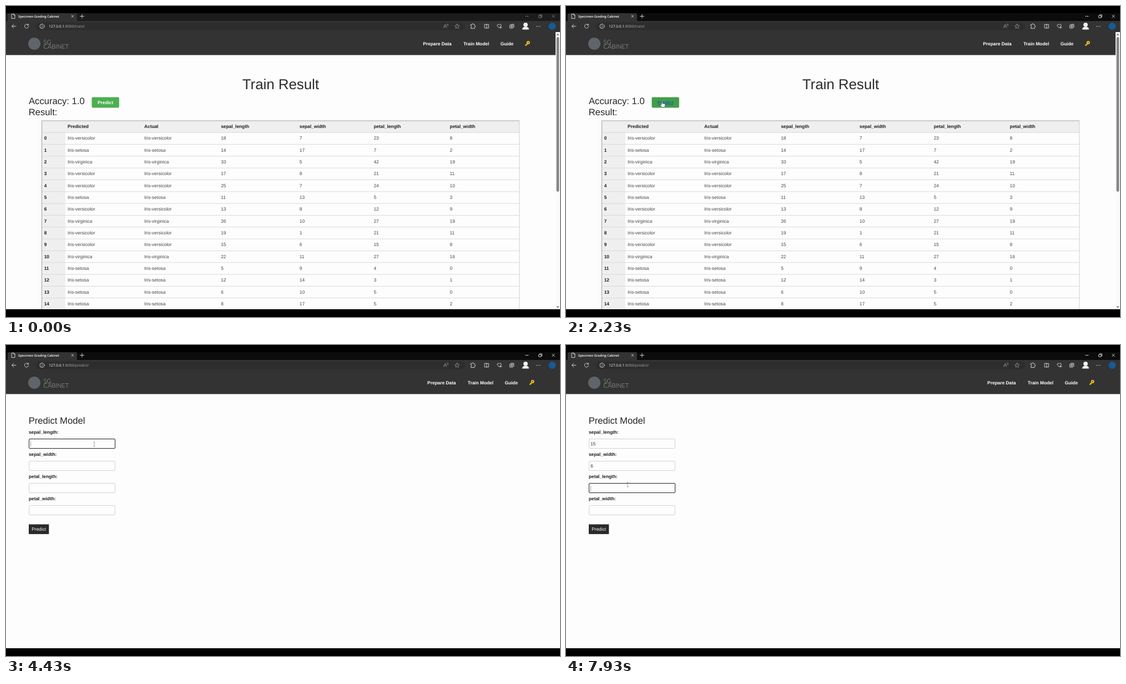
An HTML page for the animation above (8000 ms loop, 998 px wide and 561 px high).

```html
<!DOCTYPE html>
<html lang="en">
<head>
<meta charset="utf-8">
<title>Specimen Grading Cabinet</title>
<style>
  html, body { margin: 0; width: 100%; height: 100%; overflow: hidden; background: #000; }
  svg { display: block; width: 998px; height: 561px; }
  text { font: 8.32px "Liberation Sans", Arial, sans-serif; fill: #333; white-space: pre; text-rendering: geometricPrecision; }
  .bold { font-weight: bold; fill: #1c1c1c; }
  .head { font-size: 16.64px; fill: #262626; }
  .title { font-size: 25.8px; fill: #2b2b2b; }
  .white { fill: #fff; }
  .cell { fill: #444; }
  .ui { font: 6.7px "Open Sans", sans-serif; fill: #fff; }
  .tab { font-size: 5.8px; font-weight: 600; }
  .brand { font: 300 11px Lato, sans-serif; fill: #aab0b6; }
  .icon { fill: none; stroke: #ddd; stroke-width: .9; stroke-linecap: round; stroke-linejoin: round; }
  .pointer { fill: #fff; stroke: #555; stroke-width: .7; stroke-linejoin: round; }
</style>
</head>
<body>
<svg id="stage" viewBox="0 0 998 561"></svg>
<script>
const LOOP = 8000;
const ACTIVATE = 1250, HOVER = 1700, NAVIGATE = 2430;

const rect = (x, y, w, h, fill, extra = '') =>
  `<rect x="${x}" y="${y}" width="${w}" height="${h}" fill="${fill}" ${extra}/>`;
const text = (x, y, content, cls = '', extra = '') =>
  `<text x="${x}" y="${y}" class="${cls}" ${extra}>${content}</text>`;
const icon = (d, extra = '') => `<path class="icon" d="${d}" ${extra}/>`;
const ring = (x, y, r) => `<circle class="icon" cx="${x}" cy="${y}" r="${r}"/>`;
const disc = (x, y, r, fill) => `<circle cx="${x}" cy="${y}" r="${r}" fill="${fill}"/>`;

function browser() {
  return rect(0, 13, 998, 14, '#1c1c1c', 'id="titlebar"') +
    rect(0, 27, 998, 20, '#333') +
    '<path d="M3 27V16q0-3 3-3H125q3 0 3 3V27z" fill="#333"/>' +
    rect(53, 30, 774, 13.5, '#2d2d2d', 'rx="6.5"') +
    icon('M10.5 14.5H14l2 2V22.5H10.5zM14 14.5v2h2') +
    text(22, 20.6, 'Specimen Grading Cabinet', 'ui tab') +
    icon('M118 16.7l3.6 3.6m0-3.6l-3.6 3.6M133.5 18.5h7M137 15v7') +
    '<g id="controls">' +
    icon('M936 18.5h5M960 17.2h4v4h-4zM961.5 17v-1.2h4v4h-1.3M983.8 16.2l4.6 4.6m0-4.6l-4.6 4.6') + '</g>' +
    icon('M18 36.5H10.5M13.8 33.2L10.5 36.5l3.3 3.3') +
    icon('M40 34.3A3.6 3.6 0 1 0 40.6 37M40.4 32.5v2.2h-2.2') +
    ring(65, 36.5, 4) + icon('M65 36v2.3M65 34.5v.1') +
    text(77, 39, '127.0.0.1<tspan id="path" fill="#aaa"></tspan>', 'ui') +
    icon('M788.3 39.5l2.7-6.5 2.7 6.5M789.3 37.2h3.5M794.5 33q1 1 0 2.5M796 32q1.5 2 0 4', 'opacity=".5"') +
    icon('M812.7 32.5l1.2 2.6 2.9.3-2.1 2 .6 2.8-2.6-1.4-2.6 1.4.6-2.8-2.1-2 2.9-.3z', 'opacity=".55"') +
    icon('M837.5 33.5h2a1.5 1.5 0 0 1 3 0h1.5v2a1.5 1.5 0 0 1 0 3v2h-6.5v-2a1.5 1.5 0 0 0 0-3z') +
    icon('M862.5 33.3h7v6.5h-7zM866 33v7') +
    icon('M888.5 39.5l-3.2-3.2a1.9 1.9 0 0 1 3.2-2.3 1.9 1.9 0 0 1 3.4 2M889 38.5h4m-2-2v4') +
    icon('M908 34.5h5v5.5h-5zM909.8 33h5v5.5M910.5 35.7v3m-1.5-1.5h3') +
    disc(936, 33.8, 3.9, '#f4f4f4') + '<path d="M930 42.5q0-5 6-5t6 5z" fill="#f4f4f4"/>' +
    [956, 959, 962].map(x => disc(x, 36.8, .7, '#ddd')).join('') +
    disc(984, 36.5, 6.5, '#175a94');
}

function siteHeader() {
  const links = [[751.3, 'Prepare Data'], [824, 'Train Model'], [890.7, 'Guide']];
  return rect(0, 47, 998, 41.5, '#333', 'id="navbar"') +
    disc(51, 68, 11, '#5f656b') +
    text(67.5, 69, 'SG', 'brand') + text(67.5, 76.6, 'CABINET', 'brand') +
    '<g id="links">' + links.map(([x, s]) => text(x, 70.5, s, 'bold white')).join('') +
    '<path d="M939.8 67.2l-4.3 4.3m1.8-1.8l1.2 1.2" stroke="#ffc020" stroke-width="1.8"/>' +
    '<circle cx="940.8" cy="66" r="2" fill="none" stroke="#ffc020" stroke-width="2"/></g>';
}

function resultPage() {
  const columns = [111, 249, 387.2, 528.8, 662.4, 799.6];
  const names = ['Predicted', 'Actual', 'sepal_length', 'sepal_width', 'petal_length', 'petal_width'];
  const species = { e: 'Iris-versicolor', s: 'Iris-setosa', v: 'Iris-virginica' };
  const rows = `e 18 7 23 8|s 14 17 7 2|v 33 5 42 19|e 17 8 21 11|e 25 7 24 10|s 11 13 5 3|e 13 8 12 9|v 26 10 27 19|
    e 19 1 21 11|e 15 6 15 8|v 22 11 27 16|s 5 9 4 0|s 12 14 3 1|s 6 10 5 0|s 8 17 5 2`.split('|');
  const pitch = 21.32;
  const body = rows.map((row, i) => {
    const [kind, ...values] = row.trim().split(' ');
    const y = 241.4 + i * pitch;
    return rect(64, y - 13.6, 861, .9, '#d6d6de') + text(68.7, y, i, 'bold') +
      [species[kind], species[kind], ...values].map((v, c) => text(columns[c], y, v, 'cell')).join('');
  }).join('');
  return text(425.8, 150.3, 'Train Result', 'title') +
    text(41, 177.2, 'Accuracy: 1.0', 'head') + text(40.7, 196.6, 'Result:', 'head') +
    rect(154.5, 164.5, 49.3, 19, '#4caf50', 'rx="2" id="predict"') +
    text(165, 177, 'Predict', 'bold', 'id="predictLabel"') +
    rect(64, 207, 861, 21, '#efefef') + rect(64, 228, 43, 319, '#efefef') +
    names.map((s, c) => text(columns[c], 220.1, s, 'bold')).join('') + body +
    '<path d="M64.5 547V207H925" fill="none" stroke="#a2a2a8"/>' + rect(924.5, 207, .8, 340, '#c6c6cc') +
    rect(990, 47, 8, 500, '#fafafa') + rect(991.6, 56, 4.8, 279, '#858585', 'rx="2.4"') +
    '<path d="M991.5 53l2.5-3.5 2.5 3.5zM991.5 541.5l2.5 3.5 2.5-3.5z" fill="#808080"/>';
}

const FIELD_PITCH = 40;
const fieldTop = i => 169 + i * FIELD_PITCH;

function formPage() {
  const labels = ['sepal_length:', 'sepal_width:', 'petal_length:', 'petal_width:'];
  return text(40.7, 141.6, 'Predict Model', 'head') +
    labels.map((s, i) => text(41, 159.8 + i * FIELD_PITCH, s, 'bold') +
      rect(41.5, fieldTop(i) + .5, 155, 17, '#fdfdfd', 'rx="1.5" class="field"') +
      text(44.2, fieldTop(i) + 11.8, '', 'value')).join('') +
    rect(44, 0, 1, 9, '#999', 'id="caret"') +
    rect(41, 323.5, 36.3, 17.6, '#2a2a2a') + text(46.2, 335, 'Predict', 'white');
}

const pointers =
  '<g id="pointer">' +
  '<path id="arrow" class="pointer" d="M0 0V8.2L1.9 6.5 3.1 9.3 4.4 8.7 3.2 6H5.6z"/>' +
  '<path id="hand" class="pointer" d="M-.8 1V-4.2q.8-1.3 1.6 0V-1.2l4 .9q.9.4.8 1.3L4.7 5.6H-.4L-3.2 1.8q.2-1.3 1.4-.5z"/>' +
  '<path id="beam" d="M-1.6-3.8H-.4Q0-3.8 0-3.3V3.3Q0 3.8-.4 3.8H-1.6M1.6-3.8H.4Q0-3.8 0-3.3M0 3.3Q0 3.8.4 3.8H1.6" fill="none" stroke="#777" stroke-width=".7"/></g>';

const $ = id => document.getElementById(id);
$('stage').innerHTML = rect(0, 47, 998, 500, '#fdfdfd') + browser() + siteHeader() +
  `<g id="result">${resultPage()}</g><g id="form">${formPage()}</g>` + pointers + rect(0, 547, 998, 14, '#000');
const fields = [...document.querySelectorAll('.field')];
const values = [...document.querySelectorAll('.value')];

// Pointer stops: time, x, y
const path = [
  [1250, 300, 262], [1750, 173, 177], [2450, 173, 177], [2780, 240, 186], [3300, 240, 186],
  [4000, 159, 179], [5200, 159, 179], [5550, 130, 211], [6950, 130, 211], [7500, 111, 252], [LOOP, 111, 252]
];
const focusTimes = [4200, 5650, 7650];
const keys = [[4900, 0, '1'], [5060, 0, '5'], [6600, 1, '6']];

const show = (id, on) => $(id).setAttribute('visibility', on ? 'inherit' : 'hidden');
const set = (el, attrs) => Object.entries(attrs).forEach(([k, v]) => el.setAttribute(k, v));

function pointerAt(t) {
  const i = Math.max(1, path.findIndex(p => p[0] > t));
  const [t0, x0, y0] = path[i - 1], [t1, x1, y1] = path[i];
  const p = Math.min(1, Math.max(0, (t - t0) / (t1 - t0)));
  const e = p * p * (3 - 2 * p);
  return [x0 + (x1 - x0) * e, y0 + (y1 - y0) * e];
}

function draw(t) {
  const onForm = t >= NAVIGATE, active = t >= ACTIVATE, hover = t >= HOVER && !onForm;
  $('result').style.display = onForm ? 'none' : '';
  $('form').style.display = onForm ? '' : 'none';
  $('titlebar').setAttribute('fill', active ? '#0c0c0c' : '#1c1c1c');
  $('controls').setAttribute('opacity', active ? 1 : .5);
  $('path').textContent = onForm ? ':8000/predict/' : ':8000/train/';
  $('links').setAttribute('transform', `translate(${onForm ? 7.8 : 0} 0)`);
  $('navbar').setAttribute('width', onForm ? 998 : 990);
  $('predict').setAttribute('fill', hover ? '#439d48' : t > 600 ? '#47a64c' : '#4caf50');
  $('predictLabel').style.cssText = hover ? 'fill:#1461b0;text-decoration:underline' : 'fill:#fff';

  const focus = focusTimes.filter(f => t >= f).length - 1;
  fields.forEach((field, i) => set(field, {
    stroke: i === focus ? '#222' : '#d2d2d6', 'stroke-width': 1
  }));
  const typed = keys.filter(k => t >= k[0]);
  values.forEach((v, i) => v.textContent = typed.filter(k => k[1] === i).map(k => k[2]).join(''));
  if (focus >= 0) {
    const count = values[focus].textContent.length;
    const since = t - Math.max(focusTimes[focus], ...typed.map(k => k[0]));
    set($('caret'), { x: 44 + count * 4.63, y: fieldTop(focus) + 5 });
    show('caret', since % 1000 < 500);
  } else show('caret', false);

  const [x, y] = pointerAt(t);
  const overText = onForm && x < 197 && t > 3300;
  show('pointer', active);
  show('hand', active && hover);
  show('beam', active && overText);
  show('arrow', active && !hover && !overText);
  $('pointer').setAttribute('transform', `translate(${x} ${y})`);
}

const start = performance.now();
function tick() {
  draw((performance.now() - start) % LOOP);
  requestAnimationFrame(tick);
}
tick();
</script>
</body>
</html>
```
